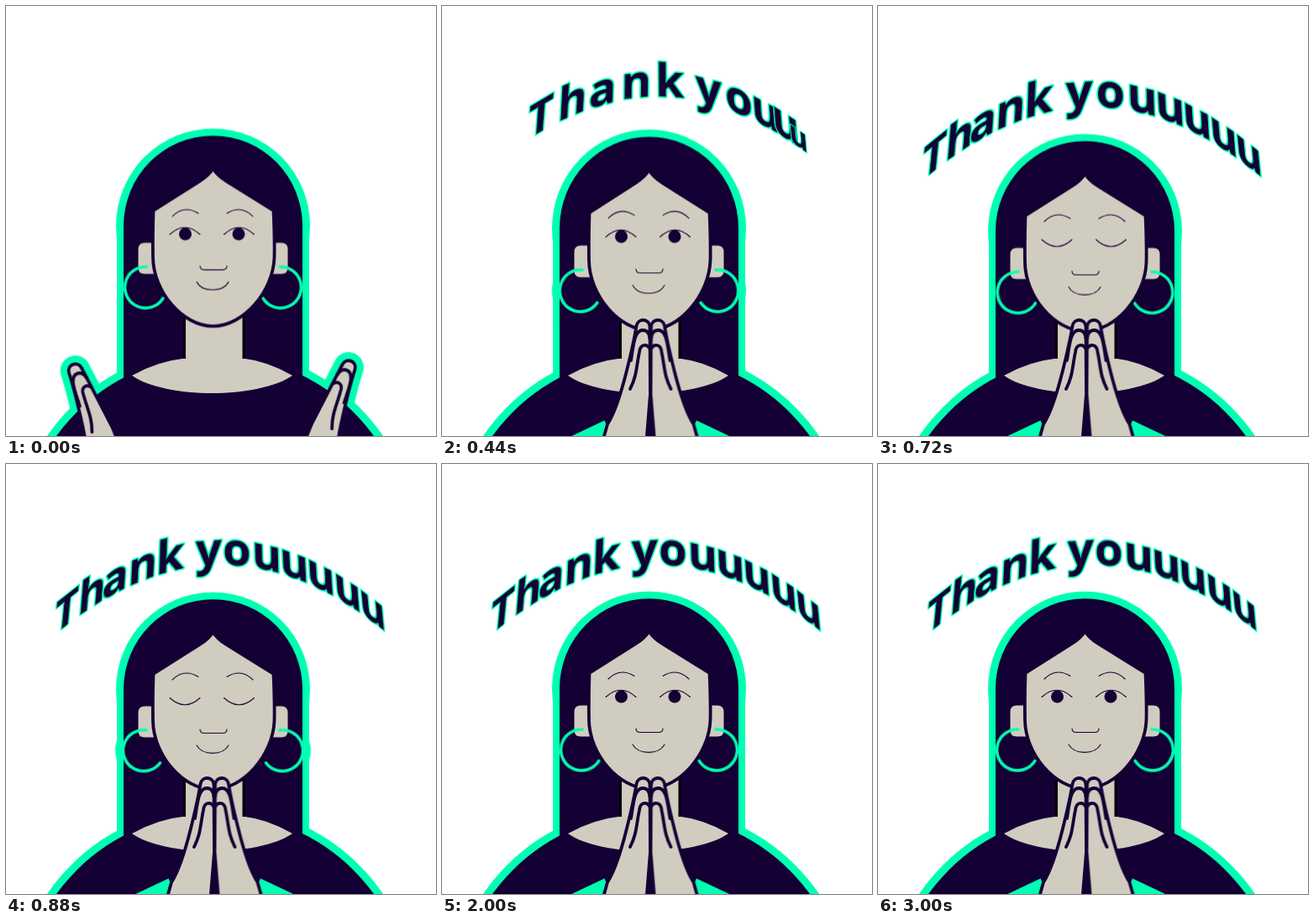
These frames come from a looping animation (512x512 px, 3.04 s). An HTML page:

```html
<!DOCTYPE html>
<html lang="en">
<head>
<meta charset="utf-8">
<title>Thank you</title>
<style>
  :root { --dark: #140034; --green: #00ffb2; --skin: #d1ccc0; }
  html, body { margin: 0; width: 100%; height: 100%; overflow: hidden; background: #fff; }
  svg { display: block; width: 100vw; height: 100vh; }

  .dark { fill: var(--dark); }
  .green { fill: var(--green); }
  .skin { fill: var(--skin); }
  .line { fill: none; stroke: var(--dark); stroke-width: 1.1; stroke-linecap: round; }
  .edge { stroke: var(--dark); stroke-width: 3.8; stroke-linecap: round; stroke-linejoin: round; }
  .hoop { fill: none; stroke: var(--green); stroke-width: 3.6; stroke-linecap: round; }
  .glow { fill: var(--green); stroke: var(--green); stroke-width: 20; stroke-linejoin: round; }

  .head, .ring, .hand, .brows, .lid, .shade {
    animation: 3040ms cubic-bezier(.333, 0, .667, 1) infinite;
  }
  .head { transform-origin: 246px 387px; animation-name: nod; }
  .ring { transform-origin: 167px 316px; animation-name: swing; }
  .hand { transform-origin: 240px 373px; animation-name: join; }
  .brows { animation-name: raise; }
  .lid { animation-name: lid; animation-timing-function: linear; }
  .shade { animation-name: shade; animation-timing-function: linear; }

  @keyframes nod {
    0% { transform: translateY(-5.3px) scaleY(1.002); }
    7.895% { transform: translateY(-4px) scaleY(1.09); }
    17.105%, 19% { transform: translateY(.3px) scaleY(1); }
    28.947% { transform: translateY(.9px) scaleY(1); }
    42%, 100% { transform: translateY(0) scaleY(1); }
  }
  @keyframes swing {
    0% { transform: rotate(2deg); }
    9.21% { transform: rotate(14deg); }
    19.737% { transform: rotate(-3.5deg); }
    28.947% { transform: rotate(7deg); }
    39.474% { transform: rotate(0deg); }
    46.05% { transform: rotate(4deg); }
    55.92% { transform: rotate(1.5deg); }
    65.79%, 100% { transform: rotate(2deg); }
  }
  @keyframes join {
    0% { transform: translate(var(--x), var(--y)) rotate(-27deg); }
    14.474%, 100% { transform: translate(0px, 0px) rotate(0deg); }
  }
  @keyframes raise {
    0%, 17.105%, 100% { transform: translateY(0); }
    7.895% { transform: translateY(-3px); }
  }
  @keyframes lid {
    0%, 15.79%, 42.1%, 100% { d: path("M195 277.500Q213 261 231 277.500"); }
    21.05%, 36.84% { d: path("M195 277.500Q213 294 231 277.500"); }
  }
  @keyframes shade {
    0%, 15.79%, 42.1%, 100% { d: path("M195 277.500Q213 261 231 277.500V264H195Z"); }
    21.05%, 36.84% { d: path("M195 277.500Q213 294 231 277.500V264H195Z"); }
  }

  text {
    font: 600 54px "Noto Sans", "Open Sans", sans-serif;
    text-anchor: middle;
    fill: var(--dark);
    stroke: var(--green);
    stroke-width: 3.5;
    stroke-linejoin: round;
    paint-order: stroke;
    opacity: 0;
  }
</style>
</head>
<body>
<svg viewBox="0 0 512 512">
  <defs>
    <path id="palm" d="M197 498C206 484 213 462 220 434C225 414 229 397 231.500 381C233 371.500 247 371.500 247.500 382L248 462L242.500 530H188Z"/>
    <g id="fingers" fill="none" class="edge">
      <path d="M225 422C228 404 229 386 239 386C245 386 247 390 247.500 396"/>
      <path d="M247.500 408C244 402 236 402 235 412C231 432 232 440 224 456"/>
    </g>
    <g id="arm">
      <path class="green" d="M193.500 493.500L215 545L110 533Z"/>
      <use href="#palm" class="skin edge"/>
      <use href="#fingers"/>
    </g>
    <path id="ear" class="skin" d="M178 287.500H165Q157.500 287.500 157.500 295V317Q157.500 324.500 165 324.500H178Z"/>
    <path id="hoop" class="hoop" d="M167 316A24.500 24.500 0 1 0 188.200 352.700"/>
    <circle id="disc" class="green" cx="167" cy="340.500" r="34"/>
  </defs>

  <!-- green outline -->
  <g class="green">
    <circle cx="249" cy="649" r="242.500"/>
    <path d="M132 300H361V460H132Z"/>
    <g class="head">
      <circle cx="246.500" cy="267.200" r="115.500"/>
      <path d="M132 267H361V375H132Z"/>
      <g class="ring"><use href="#disc"/></g>
      <g transform="translate(493 0) scale(-1 1)"><g class="ring"><use href="#disc"/></g></g>
    </g>
  </g>
  <g class="hand" style="--x:-161px;--y:53px"><use href="#palm" class="glow"/></g>
  <g transform="translate(496.500 0) scale(-1 1)">
    <g class="hand" style="--x:-155px;--y:49px"><use href="#palm" class="glow"/></g>
  </g>

  <!-- hair and body -->
  <g class="dark">
    <circle cx="249" cy="649" r="233.500"/>
    <path d="M140 300H353V460H140Z"/>
    <path class="head" d="M140 267.200A106.500 107 0 0 1 353 267.200V375H140Z"/>
  </g>

  <!-- neck -->
  <path class="skin" d="M150 440Q180 423 213 419.500V350H282V419.500Q312 423 341 440C300 468 190 468 150 440Z"/>
  <path d="M212.500 365V420M283 365V420" stroke="#000" stroke-width="3"/>

  <g class="head">
    <use href="#ear"/>
    <use href="#ear" transform="translate(493 0) scale(-1 1)"/>
    <g class="ring"><use href="#hoop"/></g>
    <g transform="translate(493 0) scale(-1 1)"><g class="ring"><use href="#hoop"/></g></g>

    <path class="skin edge" d="M246.500 199Q251 207 263 214.500L318.500 249Q320 282 319.500 305C318 345 283 386.500 246.500 386.500C210 386.500 175.500 345 175 305Q174.500 282 175.500 249L230 214.500Q242 207 246.500 199Z"/>

    <g class="brows line">
      <path d="M198 256Q212 242 229 252.500"/>
      <path d="M294 256Q280 242 263 252.500"/>
    </g>
    <g>
      <circle class="dark" cx="213.500" cy="277" r="7.500"/>
      <path class="shade skin"/>
      <path class="lid line"/>
    </g>
    <g transform="translate(490.500 0) scale(-1 1)">
      <circle class="dark" cx="213.500" cy="277" r="7.500"/>
      <path class="shade skin"/>
      <path class="lid line"/>
    </g>
    <path class="line" d="M231 315Q231 319.500 236 319.500H258Q263 319.500 263 315"/>
    <path class="line" d="M227 334C234 346.500 258 346.500 265 334"/>
  </g>

  <!-- hands -->
  <g class="hand" style="--x:-161px;--y:53px"><use href="#arm"/></g>
  <g transform="translate(496.500 0) scale(-1 1)">
    <g class="hand" style="--x:-155px;--y:49px"><use href="#arm"/></g>
  </g>

  <g id="words"></g>
</svg>
<script>
  const LOOP = 3040, MID = 257, HALF = 190, ENTRY = 430;
  const letters = [..."Thankyouuuuu"];
  const centres = [70, 101, 129, 162, 195, 241, 275, 311, 344, 376, 408, 438];
  const words = document.getElementById("words");

  const clamp = v => Math.min(1, Math.max(0, v));
  const smooth = v => { v = clamp(v); return v * v * (3 - 2 * v); };
  const ramp = (t, from, to) => smooth((t - from) / (to - from));

  // The text bulges outwards from its middle, then settles.
  const bulge = t => ramp(t, 400, 590) * (1 - ramp(t, 600, 820));

  // Bends a letter along the arch: uprights stay upright, ends narrow a little.
  function bend(x, size, lift) {
    const n = (x - MID) / HALF;
    const y = 120 + 76 * n * n - lift;
    const wide = size * (1 - 0.13 * n * n);
    const slope = 152 * n / HALF;
    const lean = size * 0.1 * n;
    return `matrix(${[wide, wide * slope, lean, size, x, y].map(v => v.toFixed(4))})`;
  }

  function pose(i, t) {
    const start = 240 + i * 20, end = 500 + i * 4;
    const q = clamp((t - start) / (end - start));
    const b = bulge(t);
    const goal = centres[i] + 12 * b * Math.tanh(4 * (centres[i] - MID) / HALF);
    const x = ENTRY + (goal - ENTRY) * smooth(q);
    const size = Math.max(0.02, Math.min(1, q * 3.9)) * (1 + 0.07 * b);
    const lift = 12 * (1 - ramp(t, 440, 560));
    return { offset: t / LOOP, opacity: q > 0 ? 1 : 0, transform: bend(x, size, lift) };
  }

  letters.forEach((letter, i) => {
    const el = document.createElementNS("http://www.w3.org/2000/svg", "text");
    el.textContent = letter;
    words.append(el);
    const frames = [pose(i, 0)];
    for (let t = 200; t <= 840; t += 20) frames.push(pose(i, t));
    frames.push(pose(i, LOOP));
    el.animate(frames, { duration: LOOP, iterations: Infinity });
  });
</script>
</body>
</html>
```
